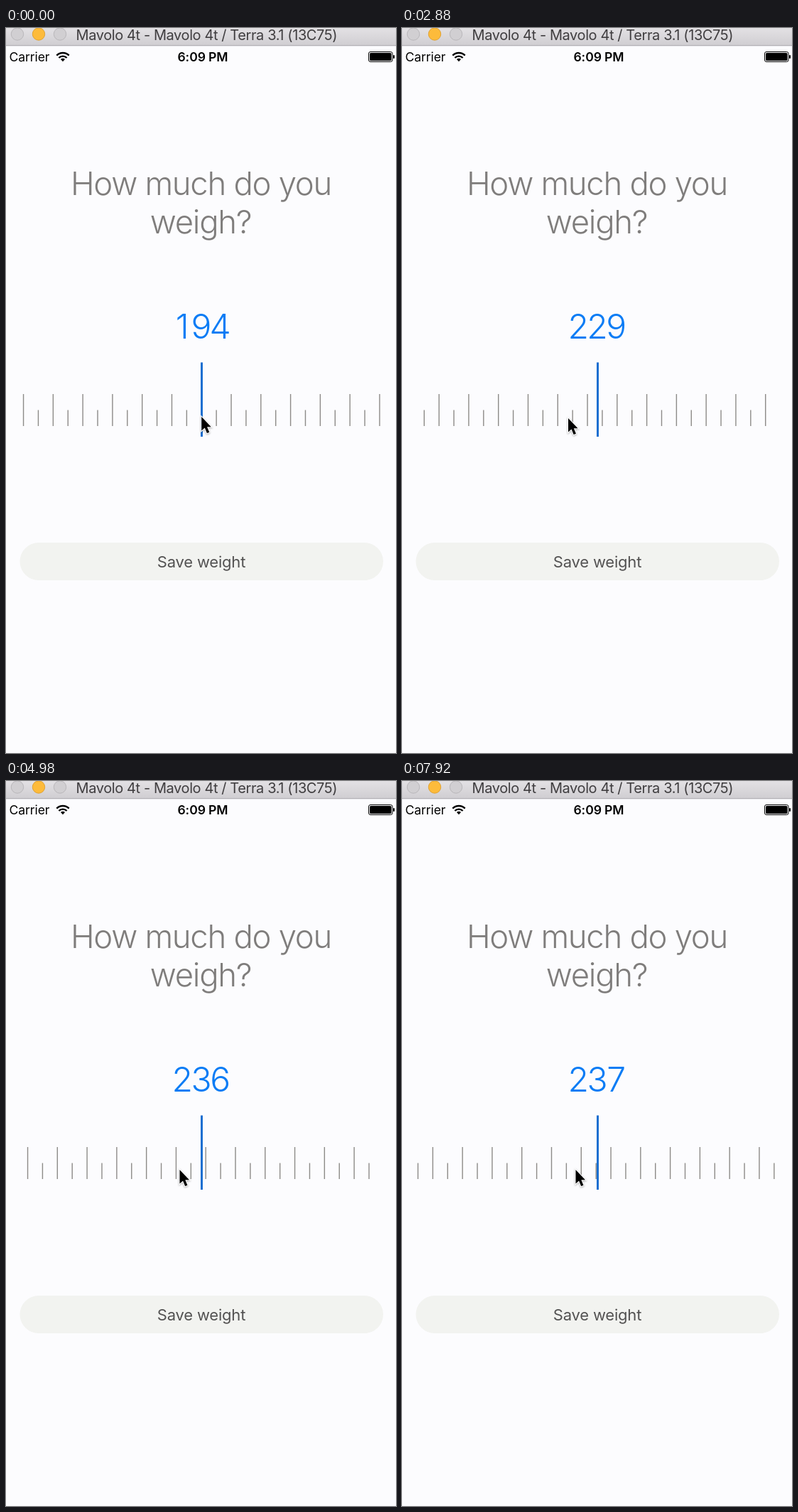
These frames come from a looping animation (549x1020 px, 8000 ms). An HTML page:

```html
<!DOCTYPE html>
<html lang="en">
<head>
<meta charset="utf-8">
<title>Weight picker</title>
<style>
  html, body { margin: 0; width: 100%; height: 100%; overflow: hidden; background: #fcfcfe; }
  svg { display: block; font-family: Inter, "Liberation Sans", sans-serif; }
  .mid { text-anchor: middle; }
  .heading { font-size: 45.5px; font-weight: 300; letter-spacing: -1.3px; fill: #7f7d7c; }
  #value { font-size: 48px; font-weight: 300; fill: #0a7cf5; }
</style>
</head>
<body>
<svg width="549" height="1020" viewBox="0 0 549 1020">
  <defs>
    <linearGradient id="bar" x2="0" y2="1">
      <stop stop-color="#e3e1e4"/><stop offset="1" stop-color="#d0ced2"/>
    </linearGradient>
  </defs>

  <rect width="549" height="24" fill="url(#bar)"/>
  <rect y="24" width="549" height="1.3" fill="#b3b1b5"/>
  <g fill="#d1cfd2" stroke="#b9b7ba">
    <circle cx="16" cy="8.5" r="8.7"/>
    <circle cx="46" cy="8.5" r="8.7" fill="#fdbb3b" stroke="#dfa235"/>
    <circle cx="76" cy="8.5" r="8.7"/>
  </g>
  <text x="98.5" y="17" font-size="20" letter-spacing="-.4" fill="#403e40">Mavolo 4t - Mavolo 4t / Terra 3.1 (13C75)</text>

  <text x="4.5" y="47" font-size="17.6" letter-spacing="-.1">Carrier</text>
  <g fill="none" stroke="#000" stroke-width="2.4">
    <path d="M71.3 38.6a12.2 12.2 0 0 1 17.4 0M74.4 42a7.8 7.8 0 0 1 11.2 0"/>
    <path d="M80 47.3l-3-3.2a4.2 4.2 0 0 1 6 0z" fill="#000" stroke="none"/>
  </g>
  <text class="mid" x="277" y="47" font-size="17.6" font-weight="600" letter-spacing="-.1">6:09 PM</text>
  <rect x="510.5" y="33.5" width="33.5" height="14" rx="2.5" fill="none" stroke="#000"/>
  <rect x="512" y="35" width="30.5" height="11" rx="1.5"/>
  <rect x="545" y="38" width="2" height="5" rx="1"/>

  <text class="mid heading" x="274.5" y="235">How much do you</text>
  <text class="mid heading" x="274" y="289">weigh?</text>
  <text class="mid" id="value" x="248.3 275 301.7" y="437"></text>

  <path id="ticks" stroke="#8d8b88" stroke-width="1.4"/>
  <rect x="274" y="470.5" width="3" height="104.5" fill="#1a6fd0"/>

  <rect x="19.5" y="724" width="511.5" height="53" rx="26.5" fill="#f2f3f0"/>
  <text class="mid" x="275" y="759" font-size="22" letter-spacing="-.2" fill="#535252">Save weight</text>

  <path id="cursor" d="M0 0V22.5L5.2 17.8L8.8 26.5L12.6 24.9L9 16.4H15.6Z"
    stroke="#fff" stroke-width="2.4" paint-order="stroke" style="filter:drop-shadow(0 1px 1px #0005)"/>
</svg>
<script>
const LOOP = 8000, TICK = 20, CENTER = 275.25, STEP = 20.89, LEFT = 18.5, RIGHT = 531;
const DRAG_START = 30, RELEASE = 900, DRAG = 95, START = 194, REST = 237.25;

// [time, value] while the dial coasts, [time, x, y] for the pointer
const coast = [[RELEASE, START + DRAG / STEP], [1160, 205.67], [2040, 221.24], [2880, 228.68],
  [4520, 234.8], [5540, 236.38], [7920, 237.1]];
const pointer = [[RELEASE, CENTER - DRAG, 551], [1160, 195.5, 551], [2040, 214.5, 551],
  [2880, 234, 549], [4520, 244.5, 547], [8000, 244.5, 547]];

const $ = id => document.getElementById(id);
const mix = (a, b, k) => a + (b - a) * k;

function segment(keys, t) {
  let i = 1;
  while (i < keys.length - 1 && t > keys[i][0]) i++;
  const a = keys[i - 1], b = keys[i];
  return [a, b, (t - a[0]) / (b[0] - a[0])];
}

function pose(t) {
  if (t < RELEASE) {
    const k = Math.max(0, (t - DRAG_START) / (RELEASE - DRAG_START)) ** 5;
    return [START + DRAG * k / STEP, CENTER - DRAG * k, mix(547, 551, k)];
  }
  // the distance left to the resting value decays exponentially
  const [a, b, k] = segment(coast, t);
  const left = (REST - a[1]) * ((REST - b[1]) / (REST - a[1])) ** k;
  const [p, q, j] = segment(pointer, t);
  return [REST - left, mix(p[1], q[1], j), mix(p[2], q[2], j)];
}

function draw(now) {
  const time = Math.floor(now % LOOP / TICK) * TICK;
  const [value, x, y] = pose(time);
  let d = "";
  for (let n = Math.ceil(value - (CENTER - LEFT) / STEP); ; n++) {
    const tx = CENTER + (n - value) * STEP;
    if (tx > RIGHT) break;
    d += `M${tx.toFixed(2)} ${n % 2 ? 537.5 : 515}V560`;
  }
  $("ticks").setAttribute("d", d);
  $("value").textContent = Math.round(value);
  $("cursor").setAttribute("transform", `translate(${x} ${y}) scale(.87)`);
  requestAnimationFrame(draw);
}
draw(0);
</script>
</body>
</html>
```
